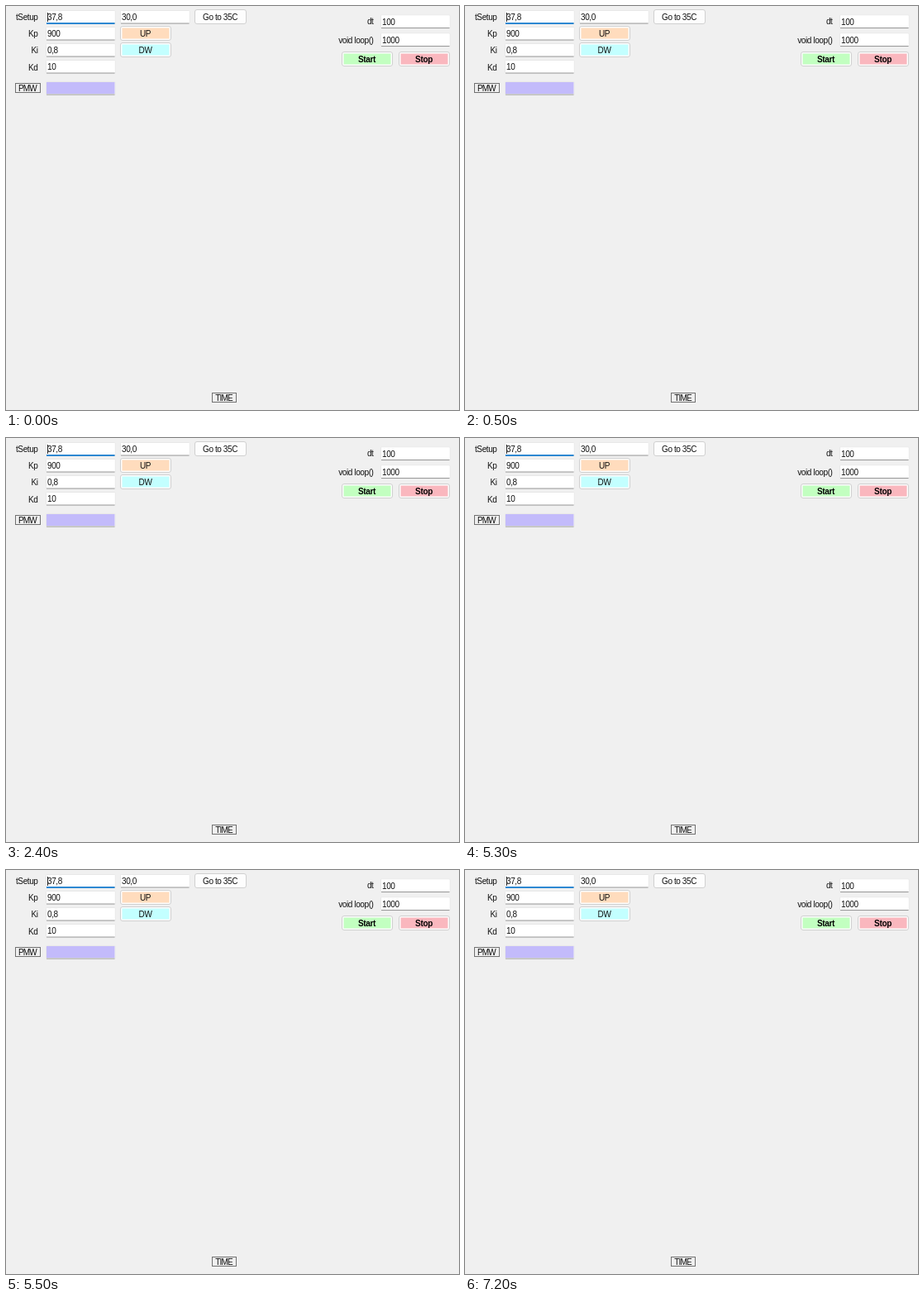
Recreate the animation shown at these times as an HTML page. Size 548x488 px, loop 8000 ms.

```html
<!DOCTYPE html>
<html>
<head>
<meta charset="utf-8">
<style>
  html, body { margin: 0; width: 100%; height: 100%; overflow: hidden; background: #f0f0f0; }
  svg { display: block; width: 548px; height: 488px; }
  text { font: 10px "Liberation Sans", Arial, sans-serif; letter-spacing: -.4px; fill: #111; }
  .mid { text-anchor: middle; }
  .end { text-anchor: end; }
  .tight { letter-spacing: -.8px; }
  .bold { font-weight: bold; letter-spacing: -.35px; fill: #000; }
</style>
</head>
<body>
<svg id="stage" viewBox="0 0 548 488"></svg>
<script>
const stage = document.getElementById('stage');

function add(tag, attrs, content = '') {
  const el = document.createElementNS('http://www.w3.org/2000/svg', tag);
  for (const key in attrs) el.setAttribute(key, attrs[key]);
  el.textContent = content;
  return stage.appendChild(el);
}
const rect = (x, y, width, height, fill, more) => add('rect', { x, y, width, height, fill, ...more });
const text = (x, y, content, cls = '') => add('text', { x, y, class: cls }, content);

function field(x, y, value, fill = '#fff') {
  rect(x + .5, y + .5, 83.5, 16, '#fff', { rx: 1, stroke: '#e8e8e8' });
  rect(x + 1, y + 1, 82.5, 14, fill);
  rect(x + 1, y + 15.5, 82.5, 1, '#999');
  text(x + 2, y + 12, value);
}

function button(x, y, w, h, label, fill, cls = 'mid') {
  const frame = rect(x + .5, y + .5, w - 1, h - 1, '#fdfdfd', { rx: 2.5, stroke: '#d0d0d0' });
  if (fill) rect(x + 2.5, y + 2.5, w - 5, h - 5, fill);
  text(x + w / 2 - .5, y + h / 2 + 3.7, label, cls);
  return frame;
}

function boxed(x, y, w, label) {
  rect(x + .5, y + .5, w - 1, 11, '#f0f0f0', { stroke: '#707070' });
  text(x + w / 2 - .5, y + 9.8, label, 'mid tight');
}

// Left column
[['tSetup', 17], ['Kp', 37], ['Ki', 57], ['Kd', 78]].forEach(([s, y]) => text(38.5, y, s, 'end'));
field(48, 5, '37,8');
field(48, 25, '900');
field(48, 45, '0,8');
field(48, 65, '10');
field(48, 91, '', '#c3bbfb');
rect(49, 20, 82.5, 2, '#2d88d2');
rect(50, 8, 1, 11, '#222');
boxed(11, 93, 31, 'PMW');

// Middle controls
field(138, 5, '30,0');
const go = button(228, 4, 63, 18, 'Go to 35C');
button(138, 24, 62, 18, 'UP', '#ffdcbd');
button(138, 44, 62, 18, 'DW', '#c3ffff');

// Right column
text(444.5, 22, 'dt', 'end');
text(444.5, 44.5, 'void loop()', 'end');
field(453, 10.5, '100');
field(453, 32.5, '1000');
button(406, 55, 62, 18, 'Start', '#c2ffc0', 'mid bold');
button(475, 55, 62, 18, 'Stop', '#fab7be', 'mid bold');

boxed(249, 467, 30, 'TIME');

function draw(now) {
  const t = now % 8000;
  const hover = t >= 5400 && t < 5500;
  go.setAttribute('fill', hover ? '#dcebf5' : '#fdfdfd');
  go.setAttribute('stroke', hover ? '#3c8fcb' : '#d0d0d0');
  requestAnimationFrame(draw);
}
draw(performance.now());
</script>
</body>
</html>
```
